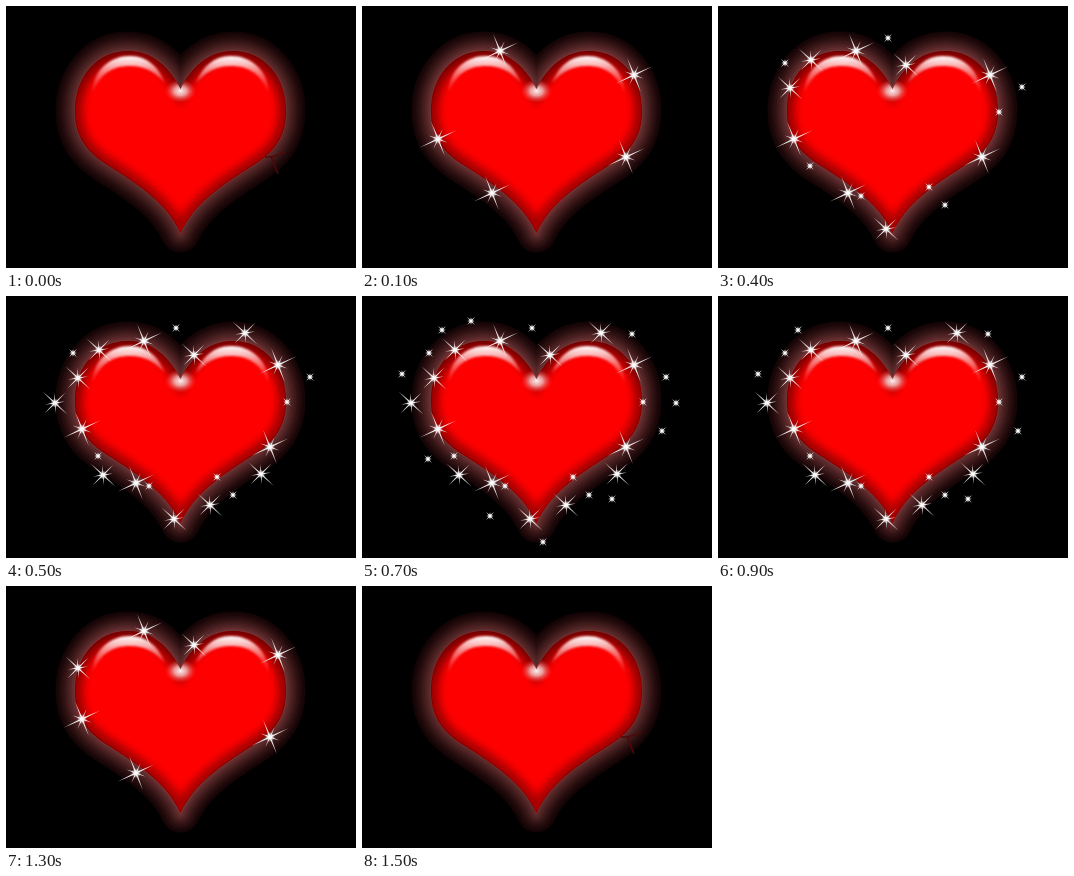
Animation of 350 by 262 pixels, one loop 1600 ms. Source, as an HTML page:

```html
<!DOCTYPE html>
<html lang="en">
<head>
<meta charset="utf-8">
<title>Sparkling heart</title>
<style>
html, body { margin: 0; width: 100%; height: 100%; overflow: hidden; background: #000; }
svg { display: block; width: 100%; height: 100%; }
</style>
</head>
<body>
<svg viewBox="0 0 350 262">
  <defs>
    <path id="heart" d="M174.5 83C164 62 147 45 122 45C91 45 69 71 69 105C69 132 82 147 103 160C135 180 162 199 174.5 227C187 199 214 180 246 160C267 147 280 132 280 105C280 71 258 45 227 45C202 45 185 62 174.5 83Z"/>
    <clipPath id="inside"><use href="#heart"/></clipPath>
    <filter id="soft" x="-20%" y="-20%" width="140%" height="140%"><feGaussianBlur stdDeviation="4.5"/></filter>
    <filter id="fine" x="-20%" y="-20%" width="140%" height="140%"><feGaussianBlur stdDeviation="0.9"/></filter>
    <linearGradient id="rim" gradientUnits="userSpaceOnUse" x1="0" y1="45" x2="0" y2="227">
      <stop offset="0" stop-color="#700000"/>
      <stop offset=".3" stop-color="#980000"/>
      <stop offset="1" stop-color="#a80000"/>
    </linearGradient>
    <linearGradient id="gloss" gradientUnits="userSpaceOnUse" x1="0" y1="50" x2="0" y2="88">
      <stop offset="0" stop-color="#fff"/>
      <stop offset=".22" stop-color="#fdd" stop-opacity=".85"/>
      <stop offset="1" stop-color="#f55" stop-opacity=".12"/>
    </linearGradient>
    <radialGradient id="dip">
      <stop offset="0" stop-color="#fff" stop-opacity=".95"/>
      <stop offset=".4" stop-color="#fcc" stop-opacity=".75"/>
      <stop offset="1" stop-color="#f33" stop-opacity="0"/>
    </radialGradient>
    <radialGradient id="core">
      <stop offset="0" stop-color="#fff"/>
      <stop offset=".35" stop-color="#fff" stop-opacity=".75"/>
      <stop offset="1" stop-color="#fff" stop-opacity="0"/>
    </radialGradient>
    <path id="shine" d="M86 88C87 63 105 50 124 50C142 50 153 62 159 77C150 67 140 60 124 60C106 60 94 68 86 88Z"/>
  </defs>
  <rect width="350" height="262"/>
  <g id="glow" fill="none" stroke-linejoin="round"></g>
  <use href="#heart" fill="#f00"/>
  <g clip-path="url(#inside)">
    <use href="#heart" fill="none" stroke="url(#rim)" stroke-width="15" filter="url(#soft)"/>
    <use href="#heart" fill="none" stroke="#500" stroke-width="1.6" opacity=".55"/>
    <ellipse cx="174.5" cy="85" rx="16" ry="12" fill="url(#dip)"/>
  </g>
  <g fill="url(#gloss)" filter="url(#fine)">
    <use href="#shine"/>
    <use href="#shine" transform="matrix(-1 0 0 1 349 0)"/>
  </g>
  <path id="nick" d="M259 151L266 151L280 146M265 150L268 158L272 168" fill="none" stroke="#500808" stroke-width="1.5"/>
  <g id="stars"></g>
</svg>
<script>
const NS = "http://www.w3.org/2000/svg";
const $ = id => document.getElementById(id);

function add(parent, tag, attrs) {
  const el = document.createElementNS(NS, tag);
  for (const k in attrs) el.setAttribute(k, attrs[k]);
  return parent.appendChild(el);
}

// Stepped halo, widest and darkest band first
const BANDS = 9;
for (let i = 0; i < BANDS; i++) {
  const k = i / (BANDS - 1), v = Math.pow(k, 1.25);
  add($("glow"), "use", {
    href: "#heart",
    stroke: `rgb(${Math.round(22 + 88 * v)},${Math.round(5 + 46 * v)},${Math.round(6 + 46 * v)})`,
    "stroke-width": 39 - 36 * k
  });
}

// Rays are [angle, length, half width]
const KINDS = {
  big: { core: 5, rays: [[-25, 20, .95], [68, 18, .9], [20, 10, .7], [-65, 11, .7]] },
  mid: { core: 4.5, rays: [[43, 17, .85], [-45, 15, .8], [-8, 10, .7], [85, 10, .7]] },
  small: { core: 3, rays: [[45, 5.5, .6], [-45, 5.5, .6], [0, 4, .5], [90, 4, .5]] }
};

// Each group: level at which it lights up, kind, positions
const GROUPS = [
  [1, "big", [[138, 45], [272, 69], [76, 133], [264, 151], [130, 187]]],
  [2, "mid", [[188, 59], [72, 82]]],
  [3, "mid", [[93, 54], [168, 223]]],
  [4, "small", [[170, 32], [67, 57], [304, 81], [281, 106], [92, 160], [143, 190], [211, 181], [227, 199]]],
  [5, "mid", [[239, 37], [49, 107], [97, 179], [204, 209], [255, 178]]],
  [6, "small", [[40, 78], [80, 34], [270, 38], [300, 135], [250, 203]]],
  [7, "small", [[109, 25], [314, 107], [66, 163], [128, 220], [181, 246]]]
];

function star(parent, kind, [x, y]) {
  const g = add(parent, "g", { transform: `translate(${x} ${y})`, fill: "#fff" });
  const { core, rays } = KINDS[kind];
  for (const [a, r, w] of rays)
    add(g, "path", { d: `M${-r} 0L0 ${-w}L${r} 0L0 ${w}Z`, transform: `rotate(${a})`, opacity: .9 });
  add(g, "circle", { r: core, fill: "url(#core)" });
}

const layers = GROUPS.map(([level, kind, spots]) => {
  const el = add($("stars"), "g", {});
  spots.forEach(p => star(el, kind, p));
  return { level, el };
});

const STEP = 100, SLOTS = 16;

function draw(t) {
  const slot = Math.floor(t / STEP) % SLOTS;
  const now = Math.min(slot, SLOTS - 1 - slot);
  for (const { level, el } of layers) el.style.display = now >= level ? "" : "none";
  $("nick").style.display = now ? "none" : "";
  $("glow").style.opacity = now ? 1 : .92;
}

const start = performance.now();
function tick() {
  draw(performance.now() - start);
  requestAnimationFrame(tick);
}
tick();
</script>
</body>
</html>
```
